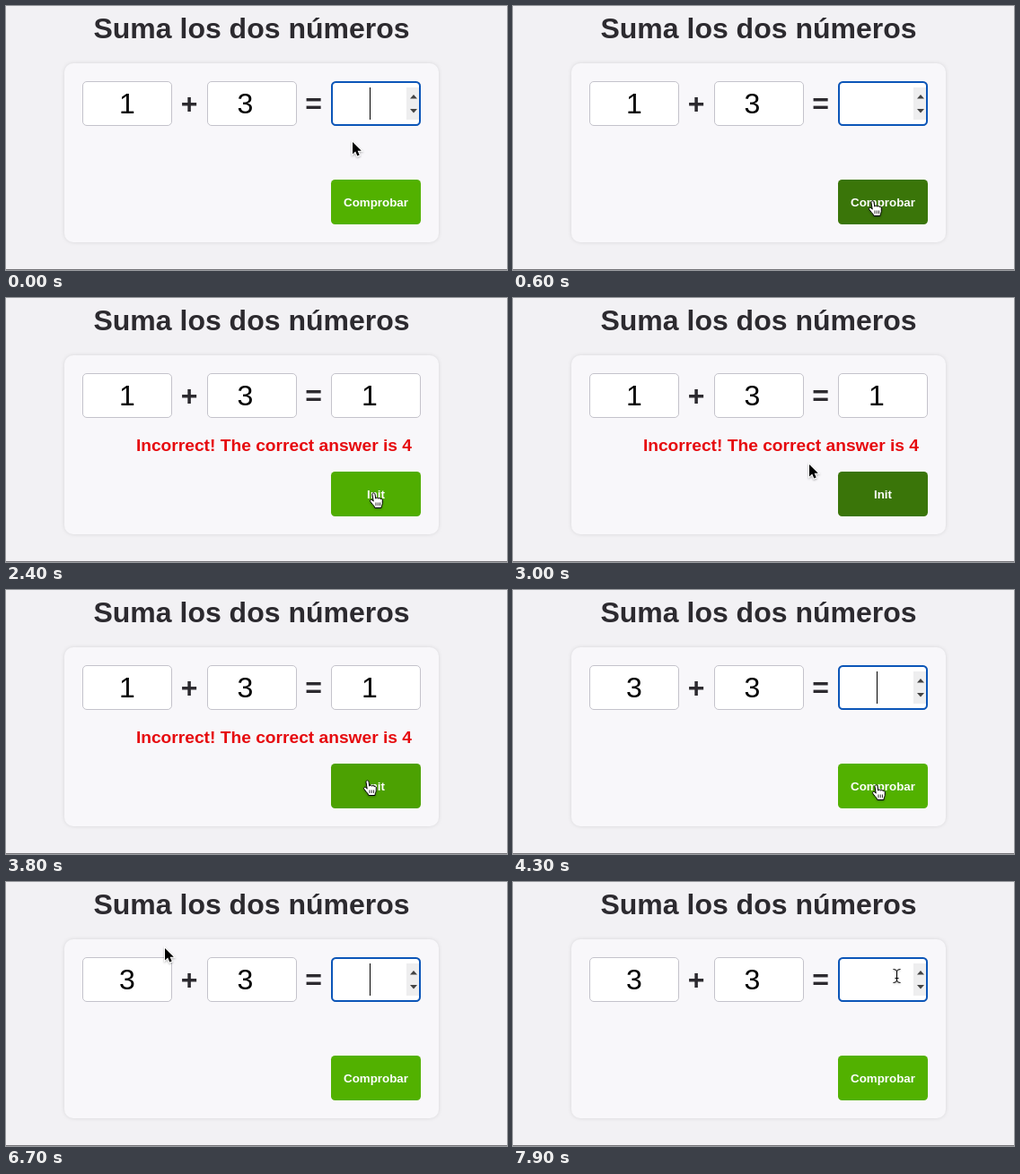
Animation of 558x295 px, one loop 8000 ms. Source, as an HTML page:

```html
<!DOCTYPE html>
<html lang="es">
<head>
<meta charset="utf-8">
<title>Suma</title>
<style>
  html, body { margin: 0; width: 100%; height: 100%; overflow: hidden; background: #f2f1f4; }
  svg { display: block; width: 558px; height: 295px; cursor: default; }
  text { font-family: "Liberation Sans", Arial, sans-serif; text-anchor: middle; }
  .bold { font-weight: 700; font-size: 32px; fill: #2c2a2f; }
  .digit { font-size: 32px; fill: #000; }
  .box { fill: #fff; stroke: #c4c3cb; }
  .card { fill: #f8f7fa; filter: drop-shadow(0 0 2px rgba(0, 0, 0, .11)); }
  .label { font-weight: 700; font-size: 13.333px; fill: #fff; }
  .alert { font-weight: 700; font-size: 19.2px; fill: #e60a0e; text-anchor: end; }
  #cursor { filter: drop-shadow(0 1px 1px rgba(0, 0, 0, .3)); }
</style>
</head>
<body>
<svg viewBox="0 0 558 295">
  <rect width="558" height="295" fill="#f2f1f4"/>
  <rect y="294" width="558" height="1" fill="#77767a"/>
  <text class="bold" x="273.5" y="36">Suma los dos números</text>
  <rect class="card" x="65" y="64" width="417" height="200" rx="10"/>

  <rect class="box" x="85.5" y="84.5" width="99" height="49" rx="4.5"/>
  <rect class="box" x="224.5" y="84.5" width="99" height="49" rx="4.5"/>
  <rect class="box" x="362.5" y="84.5" width="99" height="49" rx="4.5"/>
  <text class="bold" x="204" y="120">+</text>
  <text class="bold" x="342.5" y="120">=</text>
  <text class="digit" id="first" x="135" y="120">1</text>
  <text class="digit" x="266.3" y="120">3</text>

  <g id="focus">
    <rect x="446" y="91" width="14" height="36" fill="#eeeeef"/>
    <path d="M450 103.5L454 99L458 103.5ZM450 115L454 119.500L458 115Z" fill="#434343"/>
    <rect x="363" y="85" width="98" height="48" rx="4.5" fill="none" stroke="#0b55b8" stroke-width="2"/>
  </g>
  <text class="digit" id="answer" x="405" y="120">1</text>
  <rect id="caret" y="91" width="1" height="36"/>

  <text class="alert" id="alert" x="452" y="171">Incorrect! The correct answer is 4</text>
  <rect id="button" x="362" y="194" width="100" height="50" rx="4.5"/>
  <text class="label" id="label" x="412" y="224">Comprobar</text>

  <g id="cursor">
    <path id="arrow" d="M0 0V13.500L3.200 10.600L5.300 15.600L7.700 14.600L5.600 9.800H9.800Z"
      stroke="#fff" stroke-width="2" paint-order="stroke"/>
    <g id="hand" fill="#fff" stroke="#000" stroke-linejoin="round">
      <path d="M-2 1.500C-2 -.7 1 -.7 1 1.500L1.800 6.200C2 4.600 4.400 4.700 4.600 6.300C5 5 7 5.200 7.200 6.800C7.800 5.800 9.300 6.200 9.300 8L9.200 11.500C9 13 8 14 8 16.500H.8C.5 14.500 -1.500 13 -3 11C-4.500 9 -5 8.300 -4 7.500C-3 7 -2 7.800 -.8 9.200Z"/>
      <path d="M2 10.500V14M4.300 10.500V14M6.500 10.500V14" stroke-width=".8"/>
    </g>
    <path id="beam" d="M-3.500 -7.500Q.5 -7.500 .5 -5Q.5 -7.500 4.500 -7.500M.5 -5V5M-3.500 7.500Q.5 7.500 .5 5Q.5 7.500 4.500 7.500M-1.500 2.500H2.500"
      fill="none" stroke="#000"/>
  </g>
</svg>
<script>
  const LOOP = 8000, STEP = 100;
  const TYPED = 1600, CHECKED = 2100, RESTARTED = 4300;
  const ids = ["first", "focus", "answer", "caret", "alert", "button", "label", "cursor", "arrow", "hand", "beam"];
  const el = Object.fromEntries(ids.map(id => [id, document.getElementById(id)]));

  // Pointer path: time, shape from then on, hotspot x and y
  const path = `0 arrow 386 152|100 arrow 387 158|300 arrow 396 186|400 hand 399 203|
    600 hand 401 218|700 hand 401 218|800 hand 390 216|1000 hand 415 219|1500 hand 415 219|
    1700 hand 410 218|2800 hand 410 218|2900 hand 388 214|3000 arrow 330 186|3100 beam 245 168|
    3200 beam 155 166|3500 beam 350 168|3600 arrow 384 184|3700 hand 399 203|3800 hand 403 213|
    4000 hand 406 217|4400 hand 404 218|4500 hand 375 219|4600 arrow 335 217|4700 arrow 298 214|
    5000 arrow 302 215|5700 arrow 302 215|6000 arrow 190 160|6100 beam 148 115|6200 beam 160 92|
    6300 arrow 194 75|6400 arrow 208 78|6600 arrow 208 78|6800 arrow 146 70|6900 arrow 180 65|
    7100 arrow 264 79|7400 arrow 264 79|7600 arrow 345 88|7700 beam 400 98|7800 arrow 449 104|
    7900 beam 427 105`.split("|").map(row => {
      const [t, kind, x, y] = row.trim().split(" ");
      return { t: +t, kind, x: +x, y: +y };
    });

  // Button darkness: time and amount
  const hover = [[0, 0], [200, 0], [600, 1], [2000, 1], [2100, 0], [2300, 0], [2400, .07],
    [2800, 1], [3000, 1], [3400, 0], [3700, 0], [3800, .27], [4200, 1], [4250, 1],
    [4300, 0], [4500, .6], [4700, .27], [5000, 0]].map(([t, v]) => ({ t, v }));

  const mix = (a, b, k) => a + (b - a) * k;
  const show = (node, on) => node.style.visibility = on ? "visible" : "hidden";

  function sample(keys, t, ...names) {
    const i = keys.findLastIndex(key => key.t <= t);
    const a = keys[i], b = keys[i + 1] || a;
    const k = b === a ? 0 : (t - a.t) / (b.t - a.t);
    return { ...a, ...Object.fromEntries(names.map(n => [n, mix(a[n], b[n], k)])) };
  }

  function caretOn(t) {
    if (t >= TYPED && t < RESTARTED) return t < CHECKED;
    const start = t < TYPED ? -100 : RESTARTED;
    return Math.floor((t - start) / 500) % 2 === 0;
  }

  function draw(t) {
    const checked = t >= CHECKED && t < RESTARTED;
    const typed = t >= TYPED && t < RESTARTED;
    el.first.textContent = t < RESTARTED ? 1 : 3;
    el.label.textContent = checked ? "Init" : "Comprobar";
    show(el.focus, !checked);
    show(el.alert, checked);
    show(el.answer, typed);
    show(el.caret, caretOn(t));
    el.caret.setAttribute("x", typed ? 414 : 405);

    const { v } = sample(hover, t, "v");
    const rgb = [mix(82, 58, v), mix(177, 117, v), mix(0, 9, v)].map(Math.round);
    el.button.setAttribute("fill", `rgb(${rgb})`);

    const { kind, x, y } = sample(path, t, "x", "y");
    el.cursor.setAttribute("transform", `translate(${Math.round(x)} ${Math.round(y)})`);
    for (const name of ["arrow", "hand", "beam"]) show(el[name], name === kind);
  }

  let start;
  function tick(now) {
    start ??= now;
    // The small lead absorbs timer jitter at step edges
    draw(Math.floor((now - start + 20) / STEP) * STEP % LOOP);
    requestAnimationFrame(tick);
  }
  draw(0);
  requestAnimationFrame(tick);
</script>
</body>
</html>
```
